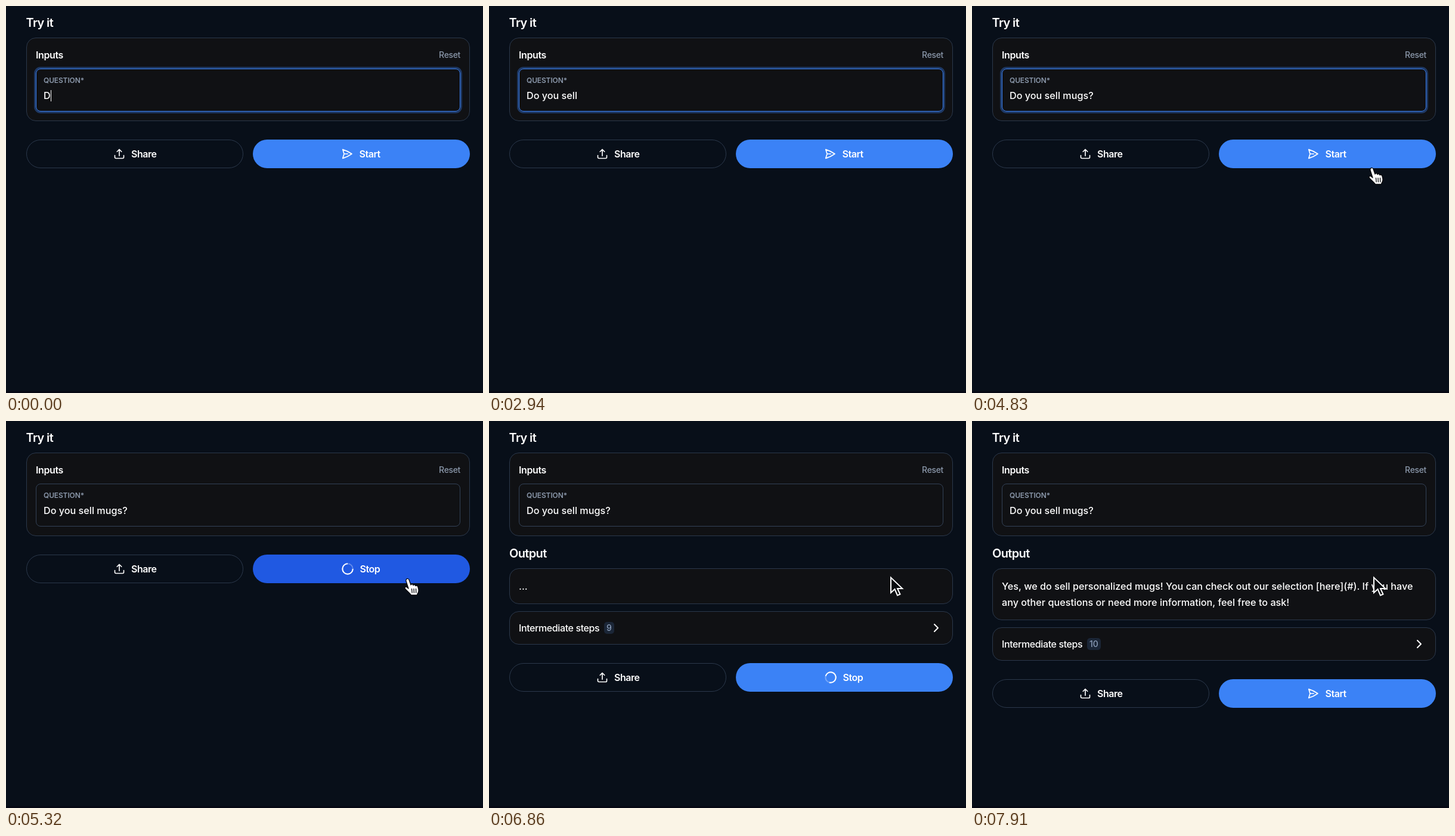
An HTML page for the animation above (8260 ms loop, 800 by 649 pixels).

```html
<!DOCTYPE html>
<html lang="en">
<head>
<meta charset="utf-8">
<title>Try it</title>
<style>
  html, body { margin: 0; width: 100%; height: 100%; overflow: hidden; background: #080f19; }
  body {
    position: relative;
    font: 500 16px/20px Inter, sans-serif;
    font-optical-sizing: none;
    font-feature-settings: "calt" 0;
    color: #fff;
  }
  * { box-sizing: border-box; }
  .abs, svg { position: absolute; }
  svg { fill: none; stroke: #fff; stroke-linecap: round; stroke-linejoin: round; overflow: visible; }
  h2 { margin: 0; font-size: 20px; font-weight: 600; letter-spacing: -.032em; }
  .tight { letter-spacing: -.025em; }
  .panel { position: relative; background: #101114; border: 1px solid #2b384b; border-radius: 16px; }
  #stage { position: absolute; left: 0; top: 0; width: 800px; height: 649px; overflow: hidden; }
  #main { position: absolute; left: 34px; top: 53px; width: 744px; }
  #inputs { height: 140px; }
  #field {
    left: 15px; top: 51px; width: 712px; height: 72px;
    border: 1px solid #334257; border-radius: 8px;
  }
  #field.focus { border-color: #3b82f6; box-shadow: 0 0 0 3px rgba(59, 130, 246, .35); }
  .muted { color: #8b98ab; }
  #typed, #answer { font-size: 16.2px; }
  #typed { left: 12px; top: 34px; white-space: pre; }
  #caret { display: inline-block; width: 1px; height: 19px; margin-right: -1px; background: #fff; vertical-align: -4px; }
  #output h2 { height: 54px; line-height: 58px; }
  #answer { padding: 15.5px 15px; line-height: 27px; min-height: 60px; }
  #steps { height: 56px; margin-top: 12px; }
  #count {
    left: 158px; top: 17px; height: 20px; padding: 0 4px; border-radius: 5px;
    background: #1b2637; color: #8b9db8; font-size: 14px;
  }
  #buttons { position: relative; height: 48px; margin-top: 31px; }
  .button { top: 0; width: 364px; height: 48px; border-radius: 24px; font-weight: 600; letter-spacing: -.03em; }
  .button span { position: absolute; top: 14px; }
  #share { left: 0; border: 1px solid #2b384b; }
  #share span { left: 175px; top: 13px; }
  #run { left: 380px; }
  #edge { left: 0; top: 646px; width: 800px; height: 3px; background: #060813; }
</style>
</head>
<body>
<div id="stage">
  <h2 class="abs" style="left:33.5px;top:18px">Try it</h2>
  <div id="main">
    <div id="inputs" class="panel">
      <div class="abs tight" style="left:15px;top:18px;font-weight:600">Inputs</div>
      <div class="abs muted tight" style="right:15px;top:18px;font-size:14px">Reset</div>
      <div id="field" class="abs">
        <div class="abs muted" style="left:12px;top:9px;font-size:12px;font-weight:600;letter-spacing:-.01em">QUESTION*</div>
        <div id="typed" class="abs"><span id="text"></span><span id="caret"></span></div>
      </div>
    </div>
    <div id="output">
      <h2>Output</h2>
      <div id="answer" class="panel"></div>
      <div id="steps" class="panel">
        <div class="abs tight" style="left:15px;top:17px">Intermediate steps</div>
        <div id="count" class="abs"></div>
        <svg style="left:710.5px;top:20px" width="8" height="13" stroke-width="2"><path d="M1 1l6 6-6 6"/></svg>
      </div>
    </div>
    <div id="buttons">
      <div id="share" class="abs button">
        <svg style="left:145px;top:13px" width="20" height="20" viewBox="0 0 24 24" stroke-width="2">
          <path d="M3 15v3.750A2.250 2.250 0 0 0 5.250 21h13.500A2.250 2.250 0 0 0 21 18.750V15M7.500 7.500 12 3l4.500 4.500M12 3v13"/>
        </svg>
        <span>Share</span>
      </div>
      <div id="run" class="abs button">
        <svg id="send" style="left:147.5px;top:14px" width="20" height="20" viewBox="0 0 24 24" stroke-width="2">
          <path d="M6 12 3.27 3.13A59.8 59.8 0 0 1 21.5 12 59.8 59.8 0 0 1 3.27 20.88L6 12h7.5"/>
        </svg>
        <svg id="spinner" style="left:149px;top:14px" width="20" height="20" viewBox="-10 -10 20 20" stroke-width="2">
          <circle r="8.7" stroke-opacity=".3"/>
          <path id="arc" d="M8.7 0A8.7 8.7 0 1 1 0-8.7" stroke-linecap="butt"/>
        </svg>
        <span id="label"></span>
      </div>
    </div>
  </div>
  <div id="edge" class="abs"></div>
  <svg id="arrow" width="22" height="34" stroke-width="2" style="stroke-linejoin:miter">
    <path fill="#080a0e" d="M1 2.5V28L7.5 22 12 32.5l4.5-2L12 20.9h8.2Z"/>
  </svg>
  <svg id="hand" width="26" height="30" stroke-width="1.3" style="stroke:#05070b">
    <path fill="#fff" d="M4.5 2.5C6 .5 8.5 1.5 9 3.5L12 12c.5-2 3.5-2 4 .5 1-1.5 3.5-1 3.8 1 1.2-1 3.7-.5 4.200 2l1 4.500c.5 3-1 5-2 7l-.5 2h-10C11 26 7 23.500 2.500 18.500 1 16.500 3 14.500 5 15.500L8 18 4 5.500C3.600 4.300 3.800 3.300 4.500 2.500Z"/>
    <path d="M13.5 18.5l.6 6.5M17 18.5l.4 6.5M20.5 18.5l.2 6.5"/>
  </svg>
</div>
<script>
  const $ = id => document.getElementById(id);
  const LOOP = 8260, STEP = 70, BLINK = 500, KEY_LEAD = 10;
  const QUESTION = 'Do you sell mugs?';
  const ANSWER = ('Yes, we do sell personalized mugs! You can check out our selection [here](#). ' +
    'If you have any other questions or need more information, feel free to ask!').split(' ');
  const KEYS = [0, 140, 490, 700, 1050, 1190, 1400, 1680, 1820, 2100, 2310, 2450, 3150, 3290, 3360, 3500, 3850];

  const ENTER = 4550, HOVER = 4830, PRESS = 5040, RUN = 5180, OPEN = 5670, STREAM = 6990, DONE = 7910;
  // time, x, y of the pointer tip
  const PATH = [[ENTER, 802, 278], [HOVER, 669, 271], [4970, 672, 264], [OPEN - STEP, 672, 264], [OPEN, 672.5, 261]];
  const BLUE = [59, 130, 246], DEEP = [32, 89, 226];

  const clamp = v => Math.max(0, Math.min(1, v));
  const mix = (a, b, k) => a + (b - a) * k;
  const show = (id, on) => { $(id).style.display = on ? '' : 'none'; };
  const setText = (id, s) => { if ($(id).textContent !== s) $(id).textContent = s; };

  function pointer(t) {
    let i = 0;
    while (i < PATH.length - 2 && t >= PATH[i + 1][0]) i++;
    const [t0, x0, y0] = PATH[i], [t1, x1, y1] = PATH[i + 1];
    const k = 1 - (1 - clamp((t - t0) / (t1 - t0))) ** 2;
    return [mix(x0, x1, k), mix(y0, y1, k)];
  }

  function stepCount(t) {
    if (t < 6440) return Math.min(7, 1 + Math.floor((t - OPEN) / 50));
    return t < 6720 ? 8 : t < 6930 ? 9 : 10;
  }

  function place(id, x, y, on) {
    show(id, on);
    $(id).style.left = x + 'px';
    $(id).style.top = y + 'px';
  }

  function draw(t) {
    const typed = KEYS.filter(k => k <= t);
    const sinceKey = t - typed[typed.length - 1] + KEY_LEAD;
    const focused = t < PRESS;
    setText('text', QUESTION.slice(0, typed.length));
    $('caret').style.visibility = focused && sinceKey % (2 * BLINK) < BLINK ? 'visible' : 'hidden';
    $('field').classList.toggle('focus', focused);

    const open = t >= OPEN;
    show('output', open);
    if (open) {
      const words = t >= DONE ? ANSWER.length : Math.floor((t - STREAM) / 35);
      setText('answer', words > 0 ? ANSWER.slice(0, words).join(' ') : '...');
      setText('count', String(stepCount(t)));
    }

    const running = t >= RUN && t < DONE;
    show('send', !running);
    show('spinner', running);
    setText('label', running ? 'Stop' : 'Start');
    $('label').style.left = running ? '179.5px' : '178.5px';
    $('arc').setAttribute('transform', `rotate(${(t - 5320) * .36})`);

    const hover = clamp((t - HOVER) / 140) * (1 - clamp((t - OPEN) / 140));
    $('run').style.background = `rgb(${BLUE.map((c, i) => Math.round(mix(c, DEEP[i], hover)))})`;

    const [x, y] = pointer(t);
    const onButton = t >= HOVER && !open;
    place('hand', x - 5, y - 1, onButton);
    place('arrow', x, y - 1, t >= ENTER && !onButton);
  }

  const start = performance.now();
  function tick() {
    const t = Math.max(0, performance.now() - start) % LOOP;
    draw(Math.min(DONE, Math.floor(t / STEP) * STEP));
    requestAnimationFrame(tick);
  }
  tick();
</script>
</body>
</html>
```
